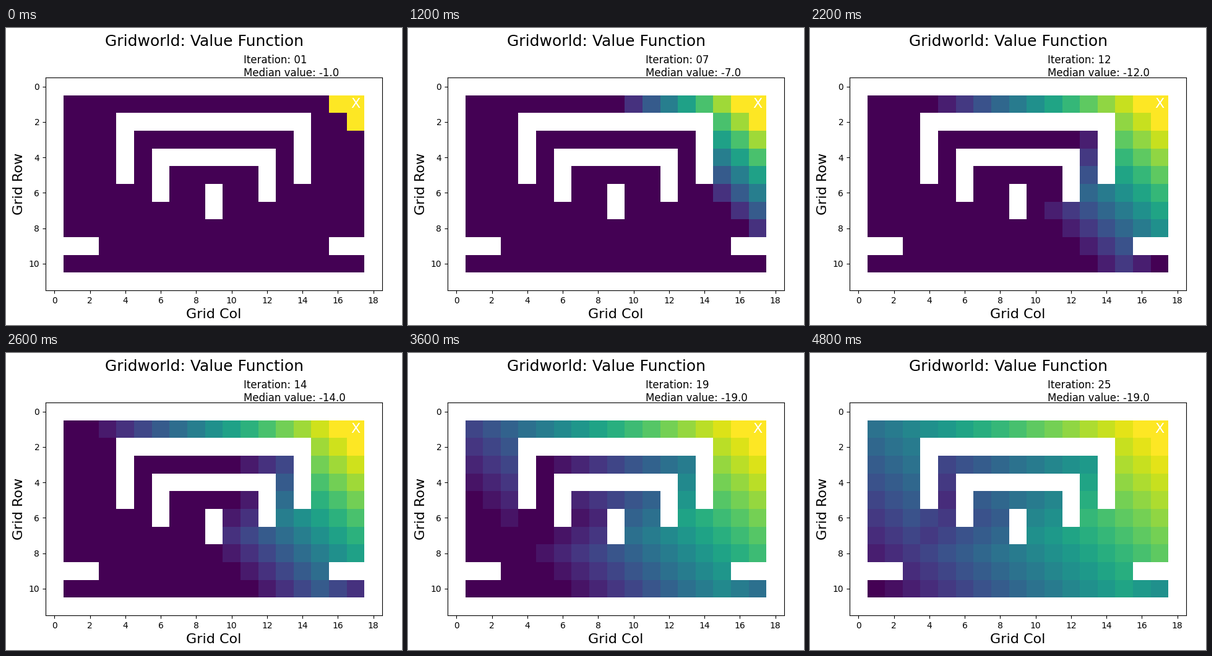
A matplotlib script that plays this animation: 640x480 px, repeating every 5 s.

```python
import numpy as np
import matplotlib.pyplot as plt
from matplotlib.animation import FuncAnimation

ROWS, COLS = 12, 19
GOAL = (1, 17)
ITERATIONS = 25

plt.rcParams["font.family"] = "DejaVu Sans"


def build_walls():
    walls = np.ones((ROWS, COLS), dtype=bool)
    walls[1:-1, 1:-1] = False
    walls[2, 4:15] = True
    walls[3:6, [4, 14]] = True
    walls[4, 6:13] = True
    walls[5:7, [6, 12]] = True
    walls[6:8, 9] = True
    walls[9, [1, 2, 16, 17]] = True
    return walls


def bellman_update(values, walls):
    """Each step costs 1, except the step that enters the goal."""
    gain = values - 1
    gain[GOAL] = 0
    updated = np.max([np.roll(gain, shift, axis)
                      for shift in (-1, 1) for axis in (0, 1)], axis=0)
    updated[GOAL] = 0
    updated[walls] = -np.inf
    return updated


walls = build_walls()
values = np.where(walls, -np.inf, 0.0)
history = []
for _ in range(ITERATIONS):
    values = bellman_update(values, walls)
    history.append(values)

fig = plt.figure(figsize=(6.4, 4.8), dpi=100, facecolor="white")
ax = fig.add_axes([0.1, 0.1, 0.85, 0.75])
image = ax.imshow(np.ma.array(history[0], mask=walls), cmap="viridis",
                  vmin=-1, vmax=0, interpolation="nearest")
ax.set_xticks(range(0, COLS, 2))
ax.set_yticks(range(0, ROWS, 2))
ax.set_xlabel("Grid Col", fontsize=16)
ax.set_ylabel("Grid Row", fontsize=16)
ax.text(GOAL[1], GOAL[0], "X", color="white", fontsize=16,
        ha="center", va="center")
fig.suptitle("Gridworld: Value Function", fontsize=18)
iteration_text = fig.text(0.6, 423 / 480, "", fontsize=12)
median_text = fig.text(0.6, 402 / 480, "", fontsize=12)


def update(frame):
    values = history[frame]
    image.set_data(np.ma.array(values, mask=walls))
    image.set_clim(values[~walls].min(), 0)
    iteration_text.set_text(f"Iteration: {frame + 1:02d}")
    median_text.set_text(f"Median value: {np.median(values):.1f}")
    return image, iteration_text, median_text


animation = FuncAnimation(fig, update, frames=ITERATIONS, interval=200,
                          repeat=True)
plt.show()
```
